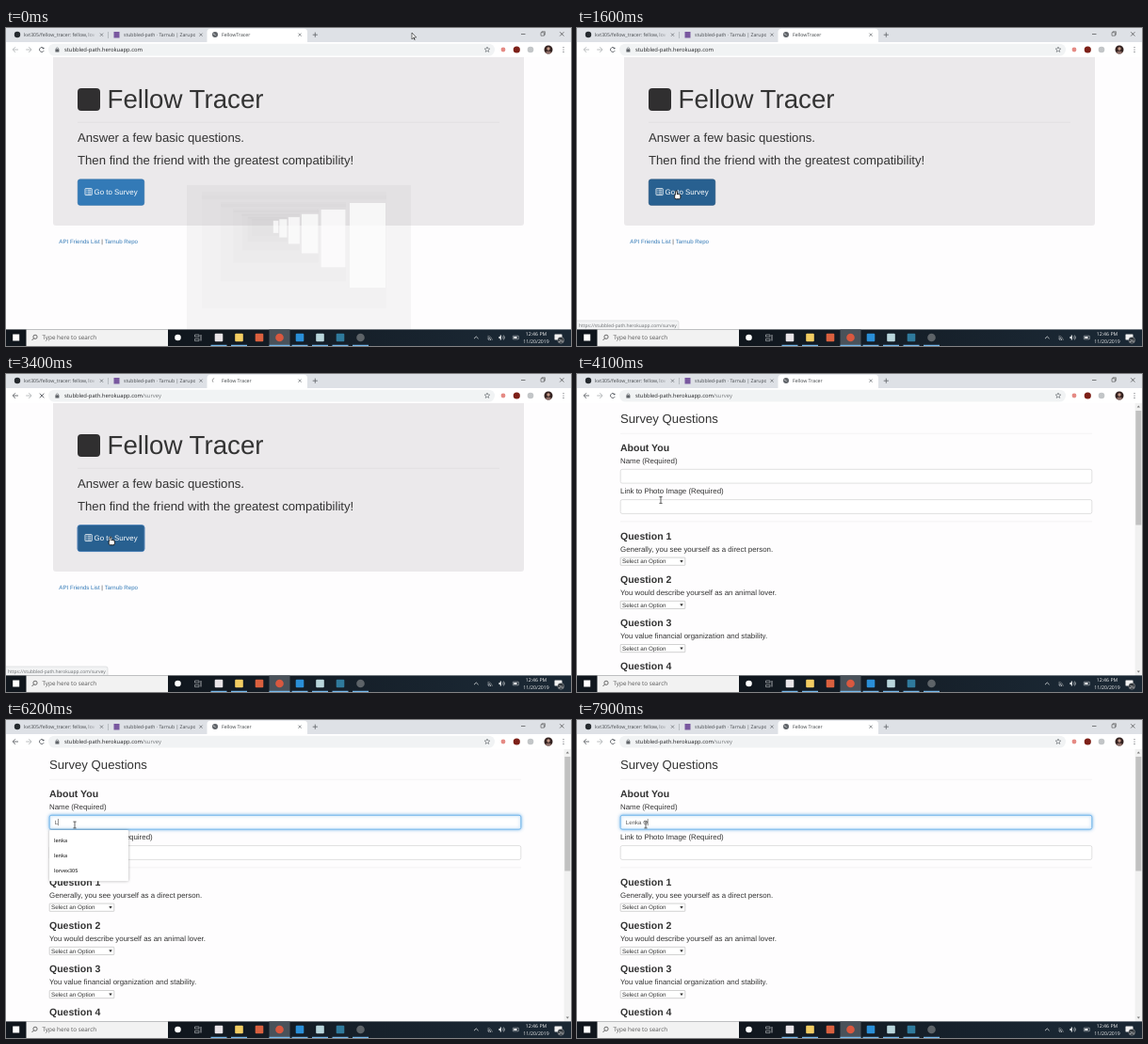
Write an HTML page with a canvas that moves like this. It is 600 px wide and 338 px high and loops after 8000 ms.

```html
<!DOCTYPE html>
<html lang="en">
<head>
<meta charset="utf-8">
<title>Fellow Tracer</title>
<style>
html, body { margin: 0; width: 100%; height: 100%; overflow: hidden; background: #fff; }
canvas { display: block; width: 100vw; height: 100vh; }
</style>
</head>
<body>
<canvas id="stage"></canvas>
<script>
const W = 600, H = 338, LOOP = 8000, BAR = 320.4;
const cv = document.getElementById('stage');
const c = cv.getContext('2d');
const PAGE = '"Liberation Sans", Arial, sans-serif';
const UI = '"Open Sans", "Noto Sans", sans-serif';
const INK = '#5f6368', LINK = '#337ab7', TRAY = '#e3e6e8';
let scale = 1;

function resize() {
  const dpr = window.devicePixelRatio || 1;
  cv.width = Math.round(innerWidth * dpr);
  cv.height = Math.round(innerHeight * dpr);
  scale = cv.width / W;
}

// Drawing helpers
function box(x, y, w, h, fill) {
  c.fillStyle = fill;
  c.fillRect(x, y, w, h);
}
function round(x, y, w, h, r, fill, stroke, lw = 0.5) {
  c.beginPath();
  c.roundRect(x, y, w, h, r);
  if (fill) { c.fillStyle = fill; c.fill(); }
  if (stroke) { c.strokeStyle = stroke; c.lineWidth = lw; c.stroke(); }
}
function disc(x, y, r, fill) {
  c.beginPath();
  c.arc(x, y, r, 0, 7);
  c.fillStyle = fill;
  c.fill();
}
function arc(x, y, r, a, b, stroke, lw = 0.7) {
  c.beginPath();
  c.arc(x, y, r, a, b);
  c.strokeStyle = stroke;
  c.lineWidth = lw;
  c.stroke();
}
function line(x, y, dx, dy, stroke, lw = 0.7) {
  c.beginPath();
  c.moveTo(x, y);
  c.lineTo(x + dx, y + dy);
  c.strokeStyle = stroke;
  c.lineWidth = lw;
  c.stroke();
}
// Triangle with its base centred on x, y and its tip h below
function tri(x, y, w, h, fill) {
  c.beginPath();
  c.moveTo(x - w / 2, y);
  c.lineTo(x + w / 2, y);
  c.lineTo(x, y + h);
  c.fillStyle = fill;
  c.fill();
}
function cross(x, y, r, color = INK, lw = 0.7) {
  line(x - r, y - r, 2 * r, 2 * r, color, lw);
  line(x - r, y + r, 2 * r, -2 * r, color, lw);
}
// Arrow with its tip at x, y; dir is 1 for right, -1 for left
function arrow(x, y, dir, color) {
  line(x, y, -5.8 * dir, 0, color, 0.9);
  for (const s of [-1, 1]) line(x, y, -2.8 * dir, 2.8 * s, color, 0.9);
}
function text(s, x, y, size, fill = '#333', font = PAGE, weight = 400, align = 'left') {
  c.font = `${weight} ${size}px ${font}`;
  c.fillStyle = fill;
  c.textAlign = align;
  c.fillText(s, x, y);
}
function glow(color, blur, draw) {
  c.save();
  c.shadowColor = color;
  c.shadowBlur = blur * scale;
  draw();
  c.restore();
}

// Timeline
const HOVER = 1450, CLICK = 2800, COMMIT = 3300, SURVEY = 3600, FOCUS = 4800, LIST = 4900;
const NAME = 'Lenka O';
const SUGGESTIONS = ['lenka', 'lenka', 'lorvex305'];
const keyTime = i => i ? 6620 + 180 * i : 5900;

function ease(t, from, to) {
  const k = Math.min(1, Math.max(0, (t - from) / (to - from)));
  return k * k * (3 - 2 * k);
}

function pointer(t) {
  const toButton = ease(t, 300, 1500), drift = ease(t, 1900, 2600);
  const toForm = ease(t, 3450, 4100), toField = ease(t, 4100, 4450);
  return {
    x: 431 - 325.5 * toButton + 5.5 * drift - 22 * toForm - 16 * toField,
    y: 5 + 168 * toButton - 39 * toForm - 22.5 * toField
  };
}

function tabs(t) {
  box(0, 0, W, 15, '#dee1e6');
  round(213.5, 0.8, 106.5, 18, 3.5, '#fff');
  disc(12, 7, 3.2, '#24292e');
  box(114.5, 4, 6, 6.5, '#79589f');
  line(108.5, 4, 0, 7, '#90949a', 0.5);
  text('kvt305/fellow_tracer: fellow, lov', 19, 9.1, 5.2, '#45494d', UI);
  const fade = c.createLinearGradient(86, 0, 97, 0);
  fade.addColorStop(0, 'rgba(222,225,230,0)');
  fade.addColorStop(1, '#dee1e6');
  box(86, 3, 19, 9, fade);
  text('stubbled-path · Tarnub | Zarupo', 125, 9.1, 5.1, '#45494d', UI);
  box(201, 3, 10, 9, '#dee1e6');
  for (const x of [101.5, 207, 312]) cross(x, 7.2, 1.6);

  if (t >= CLICK && t < SURVEY) {
    const a = t / 160;
    arc(222, 7, 2.7, a, a + 2, '#777');
  } else {
    disc(222, 7, 3, INK);
    line(220, 6, 2.6, 1.6, '#dfe1e3', 0.8);
  }
  text(t < COMMIT ? 'FellowTracer' : 'Fellow Tracer', 229, 9.1, 5.2, '#3c4043', UI);
  line(325.7, 7.2, 5.2, 0, INK, 0.8);
  line(328.3, 4.6, 0, 5.2, INK, 0.8);

  line(547, 6.5, 4.5, 0, '#333', 0.6);
  round(569, 3.8, 3.4, 3.4, 0, null, '#333');
  round(568, 4.8, 3.4, 3.4, 0, '#dee1e6', '#333');
  cross(590.3, 6.4, 2.1, '#222', 0.6);
}

function toolbar(t) {
  const mid = 23;
  box(0, 15, W, 16, '#fff');
  round(45, 16.7, 474, 12.8, 6.4, '#f1f3f4');
  arrow(7.2, mid, -1, t < COMMIT ? '#b4b7b9' : INK);
  arrow(27, mid, 1, '#b4b7b9');
  if (t >= CLICK && t < SURVEY) {
    cross(38, mid, 2.3, INK, 0.9);
  } else {
    arc(38, mid, 2.5, 0.4, 5.5, INK, 0.9);
    tri(39.6, mid - 2, 2.8, 1.8, INK);
  }
  box(52.4, 22.3, 4, 3.2, INK);
  arc(54.4, 22, 1.2, Math.PI, 0, INK, 0.6);
  const host = 'stubbled-path.herokuapp.com';
  text(host, 62, 25, 5.85, '#202124', UI);
  if (t >= COMMIT) text('/survey', 62 + c.measureText(host).width, 25, 5.85, '#73777b', UI);

  c.beginPath();
  for (let i = 0; i < 10; i++) {
    const r = i % 2 ? 1.3 : 3, a = i * Math.PI / 5 - Math.PI / 2;
    c.lineTo(511 + r * Math.cos(a), mid + r * Math.sin(a));
  }
  c.closePath();
  c.strokeStyle = INK;
  c.lineWidth = 0.6;
  c.stroke();

  disc(528, mid, 2.4, '#e58a84');
  disc(542.3, mid, 3.6, '#7d2018');
  disc(557, mid, 3.3, '#c3c6c8');
  c.save();
  c.beginPath();
  c.arc(576, mid, 4.5, 0, 7);
  c.clip();
  box(571, 18, 10, 10, '#33211f');
  disc(576, 22, 1.7, '#c59a88');
  disc(576, 28, 3.5, '#8c6c66');
  c.restore();
  for (const d of [-2.4, 0, 2.4]) disc(592, mid + d, 0.6, INK);
}

function home(t) {
  box(0, 31, W, 290, '#fefdfe');
  round(50, 31, 500, 179, [0, 0, 3, 3], '#ebe9eb');
  round(76, 64, 24, 24, 4, '#302f30');
  text('Fellow Tracer', 107.5, 85.3, 27.67);
  line(76, 100.3, 448, 0, '#d8d7d8', 0.5);
  text('Answer a few basic questions.', 76, 121.2, 13.17);
  text('Then find the friend with the greatest compatibility!', 76, 144.7, 13.17);

  const hot = t >= HOVER;
  round(76.2, 160.8, 70.6, 27.6, 2.6, hot ? '#286090' : LINK, hot ? '#204d74' : '#2e6da4');
  if (t >= CLICK) round(76, 160.6, 71, 28, 2.6, null, '#3f7fc0', 0.7);
  round(84, 170.6, 7.2, 7, 0.5, null, '#fff', 0.8);
  for (let y = 172.2; y < 177; y += 1.9) {
    line(85.4, y, 0.9, 0, '#fff', 0.8);
    line(86.8, y, 3.3, 0, '#fff', 0.8);
  }
  text('Go to Survey', 93.6, 177.2, 7.9, '#fff');

  text('API Friends List', 56.3, 229.3, 6.15, LINK);
  text('|', 101.3, 229.3, 6.15);
  text('Tarnub Repo', 104.8, 229.3, 6.15, LINK);

  if (hot) {
    round(-2, 311, 110, 12, 2, '#f2f3f4', '#c9cbcd');
    text('https://stubbled-path.herokuapp.com/survey', 2, 317.7, 4.95, '#6a6d70', UI);
  }
}

// Window fading away, with its nested corridor of screens
function ghost(t) {
  if (t >= 200) return;
  c.save();
  c.globalAlpha = 1 - t / 200;
  box(192, 167, 238, 154, 'rgba(110,110,110,.06)');
  for (let i = 0; i < 6; i++) {
    c.save();
    c.translate(270, 208);
    c.scale(0.68 ** i, 0.68 ** i);
    box(-62, -30, 196, 120, 'rgba(100,100,100,.02)');
    box(-62, -34, 196, 8, 'rgba(90,90,90,.025)');
    box(95, -22, 38, 90, 'rgba(255,255,255,.75)');
    c.restore();
  }
  c.restore();
}

function select(y) {
  round(46.2, y, 68.6, 8.2, 0.5, '#fff', '#a5a5a5');
  text('Select an Option', 48, y + 6.2, 6.3);
  tri(111, y + 3, 3.4, 2.7, '#333');
}

function input(y, focus) {
  const draw = () => round(46.2, y, 500.6, 14.8, 1.8, '#fff', focus ? '#66afe9' : '#ccc', focus ? 0.8 : 0.6);
  if (focus) glow(`rgba(102,175,233,${focus})`, 3.5, draw);
  else draw();
}

function survey(t) {
  box(0, 31, W, 290, '#fefdfe');
  text('Survey Questions', 46, 51.5, 13.17);
  for (const y of [63.3, 156.8]) line(46, y, 501, 0, '#e8e8e8', 0.5);
  text('About You', 46, 81.6, 10.53, '#333', PAGE, 700);
  text('Name (Required)', 46, 94.9, 7.9);
  text('Link to Photo Image (Required)', 46, 126.9, 7.9);
  input(101.3, t < FOCUS ? 0 : Math.min(1, 0.3 + (t - FOCUS) / 150));
  input(133.6, 0);

  const asks = [
    'Generally, you see yourself as a direct person.',
    'You would describe yourself as an animal lover.',
    'You value financial organization and stability.'
  ];
  for (let i = 0; i < 4; i++) {
    const y = 175.6 + i * 46.2;
    text('Question ' + (i + 1), 46, y, 10.53, '#333', PAGE, 700);
    if (asks[i]) {
      text(asks[i], 46, y + 13, 7.9);
      select(y + 19.5);
    }
  }

  let count = 0;
  while (count < NAME.length && keyTime(count) <= t) count++;
  const typed = NAME.slice(0, count);
  text(typed, 51.8, 110.8, 6.15, '#555');
  const last = count ? keyTime(count - 1) : FOCUS;
  if (t >= FOCUS && (t - last) % 1000 < 500) {
    line(52 + c.measureText(typed).width, 105, 0, 7.2, '#444', 0.6);
  }

  const hits = SUGGESTIONS.filter(s => s.startsWith(typed.toLowerCase()));
  if (t >= LIST && hits.length) {
    glow('rgba(0,0,0,.35)', 3, () => round(46, 117, 84, 6.5 + hits.length * 15.9, 1, '#fff'));
    hits.forEach((s, i) => text(s, 51, 129.9 + i * 15.9, 5.4, '#333', UI, 600));
  }

  box(592.6, 31, 7.4, 290, '#f1f1f1');
  box(593.3, 39, 6, 121.5, '#c1c1c1');
  tri(596.3, 35.6, 3.2, -2, '#777');
  tri(596.3, 315.5, 3.2, 2, '#777');
}

function tray() {
  for (const s of [-1, 1]) line(499.3, 328, 2.3 * s, 2.2, TRAY, 0.8);
  for (let r = 1.6; r < 5; r += 1.6) arc(511.5, 332, r, -Math.PI / 2, 0, r < 4 ? TRAY : '#83888c');
  box(523.4, 328, 1.6, 2, TRAY);
  line(525.3, 326.6, 0, 4.8, TRAY, 1.2);
  for (const r of [2, 3.4]) arc(526, 329, r, -0.8, 0.8, TRAY, 0.6);
  round(538.3, 327.2, 6, 3.6, 0.3, null, TRAY);
  box(539.2, 328, 3.4, 2, TRAY);
  text('12:46 PM', 563, 327.2, 5.2, '#f2f2f2', UI, 400, 'center');
  text('11/20/2019', 563, 335.3, 5.2, '#f2f2f2', UI, 400, 'center');
  round(582.5, 325.5, 8, 6, 0.4, '#f2f2f2');
  disc(589.2, 331.8, 3.4, '#2b3136');
  arc(589.2, 331.8, 3.4, 0, 7, '#cfd2d4', 0.4);
  text('26', 589.2, 333.5, 4.4, '#fff', UI, 400, 'center');
}

function taskbar() {
  const tint = c.createLinearGradient(170, 0, 520, 0);
  tint.addColorStop(0, '#10161d');
  tint.addColorStop(1, '#1a2733');
  box(0, BAR, W, H - BAR, tint);
  box(21.5, BAR, 150.5, H - BAR, '#f2f2f2');
  box(7.2, 325.5, 7, 7, '#fff');
  arc(31, 328.3, 2.1, 0, 7, '#333');
  line(29.5, 329.9, -2, 2.1, '#333');
  text('Type here to search', 38.5, 331.4, 6.3, '#555', UI);
  disc(182.5, 329, 3.3, '#fff');
  for (const y of [326, 330.4]) round(200.5, y, 4.5, 2.2, 0, null, TRAY);
  line(207, 326, 0, 6.5, TRAY);

  const apps = ['#e8e4e8', '#f3cd62', '#d9603f', '#d9583f', '#2a8fd8', '#b9d6dc', '#2f7a9c', '#5d6368'];
  apps.forEach((color, i) => {
    const x = 226 + i * 21.5, active = i === 3, half = active ? 11 : 8.5;
    if (active) box(x - half, BAR, 2 * half, H - BAR, '#4a525a');
    round(x - 4.3, 324.7, 8.6, 8.6, i % 4 === 3 ? 4.3 : 1, color);
    if (i !== 2) box(x - half, 336.8, 2 * half, 1.2, '#76b9ed');
  });
  tray();
}

function cursor(t) {
  const { x, y } = pointer(t);
  if (t >= SURVEY) {
    line(x, y - 3.3, 0, 6.6, '#222');
    for (const s of [-1, 1]) line(x - 1.6, y + 3.4 * s, 3.2, 0, '#222');
  } else if (t >= HOVER) {
    round(x - 0.8, y, 1.7, 6, 0.8, '#fff', '#111', 0.9);
    round(x - 1.8, y + 3.6, 6.2, 5.2, 1.6, '#fff', '#111', 0.9);
    box(x - 0.4, y + 2, 0.9, 3, '#fff');
  } else {
    c.beginPath();
    c.moveTo(x, y);
    c.lineTo(x, y + 7);
    c.lineTo(x + 1.8, y + 5.3);
    c.lineTo(x + 4.7, y + 5);
    c.closePath();
    c.fillStyle = '#fff';
    c.fill();
    c.strokeStyle = '#111';
    c.lineWidth = 0.6;
    c.stroke();
    line(x + 2, y + 5.4, 1.1, 2.4, '#111', 0.9);
  }
}

function draw(t) {
  c.setTransform(scale, 0, 0, cv.height / H, 0, 0);
  c.textRendering = 'geometricPrecision';
  tabs(t);
  toolbar(t);
  if (t < SURVEY) home(t);
  else survey(t);
  ghost(t);
  taskbar();
  cursor(t);
}

const start = performance.now();
function tick() {
  draw((performance.now() - start) % LOOP);
  requestAnimationFrame(tick);
}
addEventListener('resize', resize);
resize();
tick();
</script>
</body>
</html>
```
